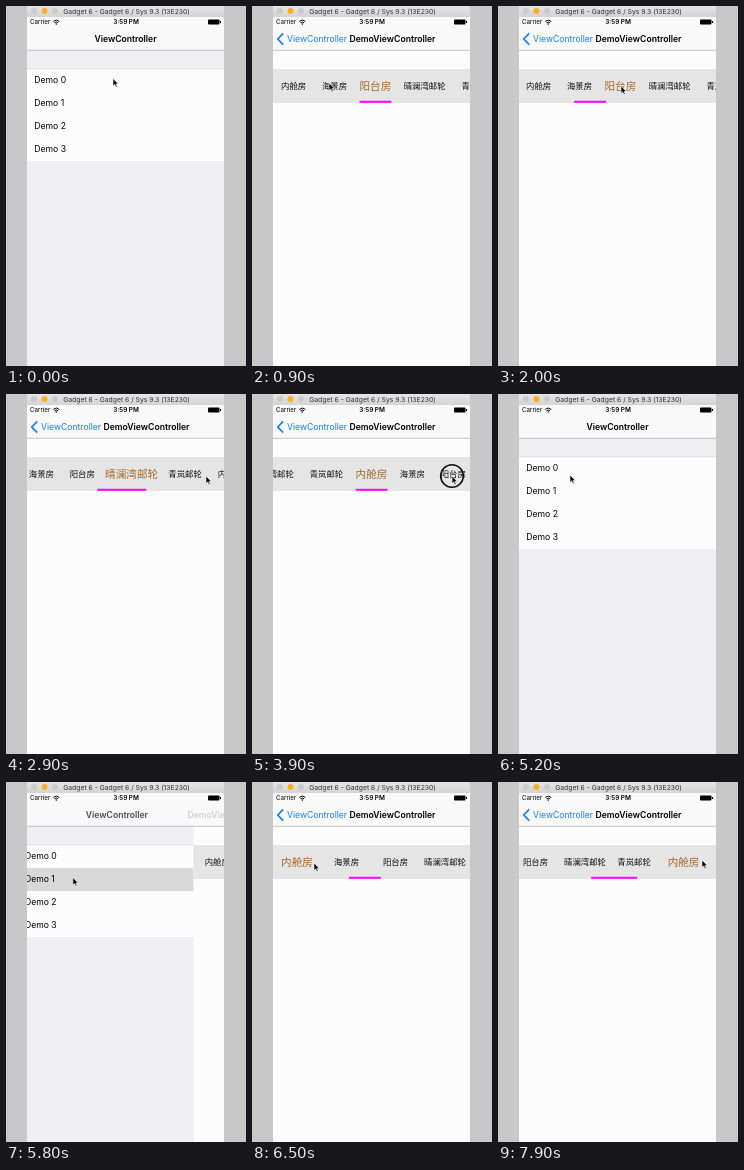
These frames come from a looping animation (240x360 px, 8000 ms). An HTML page:

```html
<!DOCTYPE html>
<html lang="zh">
<head>
<meta charset="utf-8">
<style>
html, body { margin: 0; width: 100%; height: 100%; overflow: hidden; background: #c8c8c8; }
svg { display: block; width: 240px; height: 360px; font-family: Inter, "Liberation Sans", sans-serif; }
.nav { font-size: 8.65px; }
.bold { font-weight: 600; }
.mid { text-anchor: middle; }
.tab { font-family: "Noto Sans CJK SC", "Noto Sans CJK", sans-serif; font-weight: 500; text-anchor: middle; }
</style>
</head>
<body>
<svg viewBox="0 0 240 360">
  <defs>
    <clipPath id="phone"><rect x="21" y="0" width="197" height="360"/></clipPath>
    <linearGradient id="chrome" x2="0" y2="1">
      <stop stop-color="#e6e6e6"/><stop offset="1" stop-color="#d3d3d3"/>
    </linearGradient>
  </defs>
  <rect width="240" height="360" fill="#c8c8c8"/>
  <g clip-path="url(#phone)">
    <g id="table">
      <rect x="21" y="44" width="197" height="316" fill="#efeff4"/>
      <rect x="21" y="63" width="197" height="92" fill="#fcfcfc"/>
      <path d="M21 62.7H218" stroke="#d2d2d6" stroke-width=".6"/>
      <rect id="glow" x="21" width="197" height="23" fill="#d9d9d9"/>
      <g id="rows" class="nav"></g>
    </g>
    <g id="demo" clip-path="url(#phone)">
      <rect x="21" y="44" width="197" height="316" fill="#fcfcfc"/>
      <rect x="21" y="63" width="197" height="34" fill="#e5e5e5"/>
      <g id="tabs"></g>
      <rect id="bar" y="94.8" height="2" fill="#f0f"/>
    </g>
    <rect x="21" y="11" width="197" height="33" fill="#f9f9f9"/>
    <path d="M21 44.3H218" stroke="#b5b5b8" stroke-width=".8"/>
    <g class="nav">
      <text id="rootTitle" class="bold mid" y="36">ViewController</text>
      <g id="back" fill="#157efb">
        <path d="M31.2 27.4L25.8 33L31.2 38.6" fill="none" stroke="#157efb" stroke-width="1.7"/>
        <text id="backLabel" y="36">ViewController</text>
      </g>
      <text id="demoTitle" class="bold mid" y="36">DemoViewController</text>
    </g>
    <text x="24" y="18.3" font-size="6.2">Carrier</text>
    <g fill="none" stroke="#000" stroke-width="1">
      <path d="M47.3 15.4Q50.3 12.6 53.3 15.4M48.6 16.8Q50.3 15.2 52 16.8"/>
    </g>
    <circle cx="50.3" cy="18" r=".8"/>
    <text class="bold mid" x="120" y="18.3" font-size="6.4">3:59 PM</text>
    <rect x="202" y="13.5" width="11.5" height="5" rx="1"/>
    <rect x="214" y="15" width="1" height="2"/>
    <rect x="21" width="197" height="11" fill="url(#chrome)"/>
    <circle cx="28" cy="5" r="3" fill="#cbcbcb"/>
    <circle cx="38.5" cy="5" r="3" fill="#fdaf24"/>
    <circle cx="49" cy="5" r="3" fill="#cbcbcb"/>
    <text class="mid" x="120.5" y="7.7" font-size="6.8" fill="#333">Gadget 6 - Gadget 6 / Sys 9.3 (13E230)</text>
  </g>
  <g id="cursor">
    <circle id="ring" r="11.3" fill="none" stroke="#111" stroke-width="1.6"/>
    <path d="M0 0V7.4L1.7 5.9L2.9 8.6L4.2 8L3 5.4H5.3Z" stroke="#fff" stroke-width=".6"/>
  </g>
</svg>
<script>
const LOOP = 8000, STEP = 100, MIDDLE = 119.5, SMALL = 8.4, LARGE = 10.6, GAP = 15.7;
const $ = id => document.getElementById(id);
const clamp = (v, a, b) => Math.min(b, Math.max(a, v));
const lerp = (a, b, p) => a + (b - a) * p;
const ease = u => { u = clamp(u, 0, 1); return u * u * (3 - 2 * u); };
const shift = (el, x, y = 0) => el.setAttribute('transform', `translate(${x} ${y})`);

function addText(parent, text, attrs) {
  const el = document.createElementNS('http://www.w3.org/2000/svg', 'text');
  el.textContent = text;
  for (const k in attrs) el.setAttribute(k, attrs[k]);
  parent.append(el);
  return el;
}

const names = ['内舱房', '海景房', '阳台房', '晴澜湾邮轮', '青岚邮轮'];
const labels = [...names, ...names];
const tabs = labels.map(s => addText($('tabs'), s, { class: 'tab' }));
for (let i = 0; i < 4; i++) addText($('rows'), 'Demo ' + i, { x: 28.3, y: 77 + i * 23 });

// Tab centres at zero scroll, all in the small size
let edge = 29;
const home = labels.map(s => {
  const w = s.length * SMALL, c = edge + w / 2;
  edge += w + GAP;
  return c;
});
const scrolled = off => home.map(c => c - off);
const centred = i => scrolled(clamp(home[i] - MIDDLE, 0, 262));
// Known leading centres, the rest follow at the usual spacing
const from = (...cs) => home.map((c, i) =>
  i < cs.length ? cs[i] : cs[cs.length - 1] + c - home[cs.length - 1]);

// Each step: start time, tab centres, selected tab, lag of the bar
const firstDemo = [
  [0, scrolled(0), 2, 0],
  [1150, centred(1), 1, 0],
  [1900, centred(2), 2, 0],
  [2666, centred(3), 3, 20],
  [3300, centred(5), 5, 0],
  [3980, centred(7), 7, 0]
];
const secondDemo = [
  [0, from(45, 95.8, 146.8, 196), 2, 0],
  [6384, from(45, 92, 137, 187), 0, 0],
  [7230, from(-17, 23.5, 64.5, 119.5, 178.5, 223.5, 272), 3, 0],
  [7784, from(-98, -57, -16.5, 22, 51, 109.5, 155), 5, 0]
];

const pushes = [[300, 1], [4700, 0], [5700, 1]];
const taps = [250, 4650, 5650,
  ...firstDemo.slice(1).map(s => s[0]), ...secondDemo.slice(1).map(s => s[0])];

const path = [
  [0, 107, 72.5], [300, 107, 73], [850, 77, 77], [1250, 78, 78], [1750, 122, 80],
  [2000, 123, 80], [2550, 192, 81], [2900, 200, 82], [4150, 200, 82], [4580, 38, 34],
  [4750, 38, 34], [5200, 72, 81], [5550, 67, 96], [5750, 67, 96], [6250, 61, 80],
  [6500, 62, 81], [6700, 63, 81], [7150, 187, 80], [7350, 188, 80], [7700, 204, 78],
  [LOOP, 204, 78]
];

function cursorAt(t) {
  const i = path.findIndex(k => k[0] > t);
  const [t0, x0, y0] = path[i - 1], [t1, x1, y1] = path[i];
  const p = ease((t - t0) / (t1 - t0));
  return [lerp(x0, x1, p), lerp(y0, y1, p)];
}

function drawTabs(t, steps) {
  const n = steps.filter(s => s[0] <= t).length - 1;
  const [start, centres, sel, lag] = steps[n];
  const [, before, oldSel] = steps[Math.max(0, n - 1)];
  const p = n ? ease((t - start) / 300) : 1;
  const barP = n ? ease((t - start - lag) / 300) : 1;
  const xs = centres.map((c, i) => lerp(before[i], c, p));
  tabs.forEach((el, i) => {
    const size = i === sel ? LARGE : SMALL;
    el.setAttribute('x', xs[i]);
    el.setAttribute('y', 79.7 + size * 0.37);
    el.setAttribute('font-size', size);
    el.setAttribute('fill', i === sel ? '#a5682a' : '#111');
  });
  const width = i => labels[i].length * LARGE;
  const w = lerp(width(oldSel), width(sel), barP);
  // The bar rides on the scrolled content
  const ride = steps === firstDemo
    ? lerp(home[oldSel], home[sel], barP) + xs[0] - home[0]
    : lerp(before[oldSel], centres[sel], barP);
  $('bar').setAttribute('x', ride - w / 2);
  $('bar').setAttribute('width', w);
}

function drawScreens(t) {
  let p = 0;
  for (const [start, to] of pushes) if (t >= start) p = lerp(1 - to, to, ease((t - start) / 400));
  shift($('table'), -60 * p);
  shift($('demo'), 197 * (1 - p));
  $('rootTitle').setAttribute('x', lerp(MIDDLE, 64.5, p));
  $('rootTitle').setAttribute('opacity', clamp(1 - 2 * p, 0, 1));
  $('back').setAttribute('opacity', clamp(2 * p - 1, 0, 1));
  $('backLabel').setAttribute('x', lerp(90, 35, p));
  $('demoTitle').setAttribute('x', lerp(240, 140.5, p));
  $('demoTitle').setAttribute('opacity', p);
  const row = t < 5200 ? 0 : 1;
  const lit = (t >= 200 && t < 4700) || t >= 5600;
  $('glow').setAttribute('y', 63 + row * 23);
  $('glow').setAttribute('opacity', lit ? 1 : t >= 4700 && t < 5200 ? p : 0);
}

function draw(t) {
  drawScreens(t);
  drawTabs(t, t < 5400 ? firstDemo : secondDemo);
  shift($('cursor'), ...cursorAt(t));
  const pressed = taps.some(s => t >= s - 150 && t < s + 50);
  $('ring').setAttribute('opacity', pressed ? 1 : 0);
}

const begin = performance.now();
function tick() {
  const t = (performance.now() - begin) % LOOP;
  draw(Math.floor(t / STEP) * STEP);
  requestAnimationFrame(tick);
}
tick();
</script>
</body>
</html>
```
